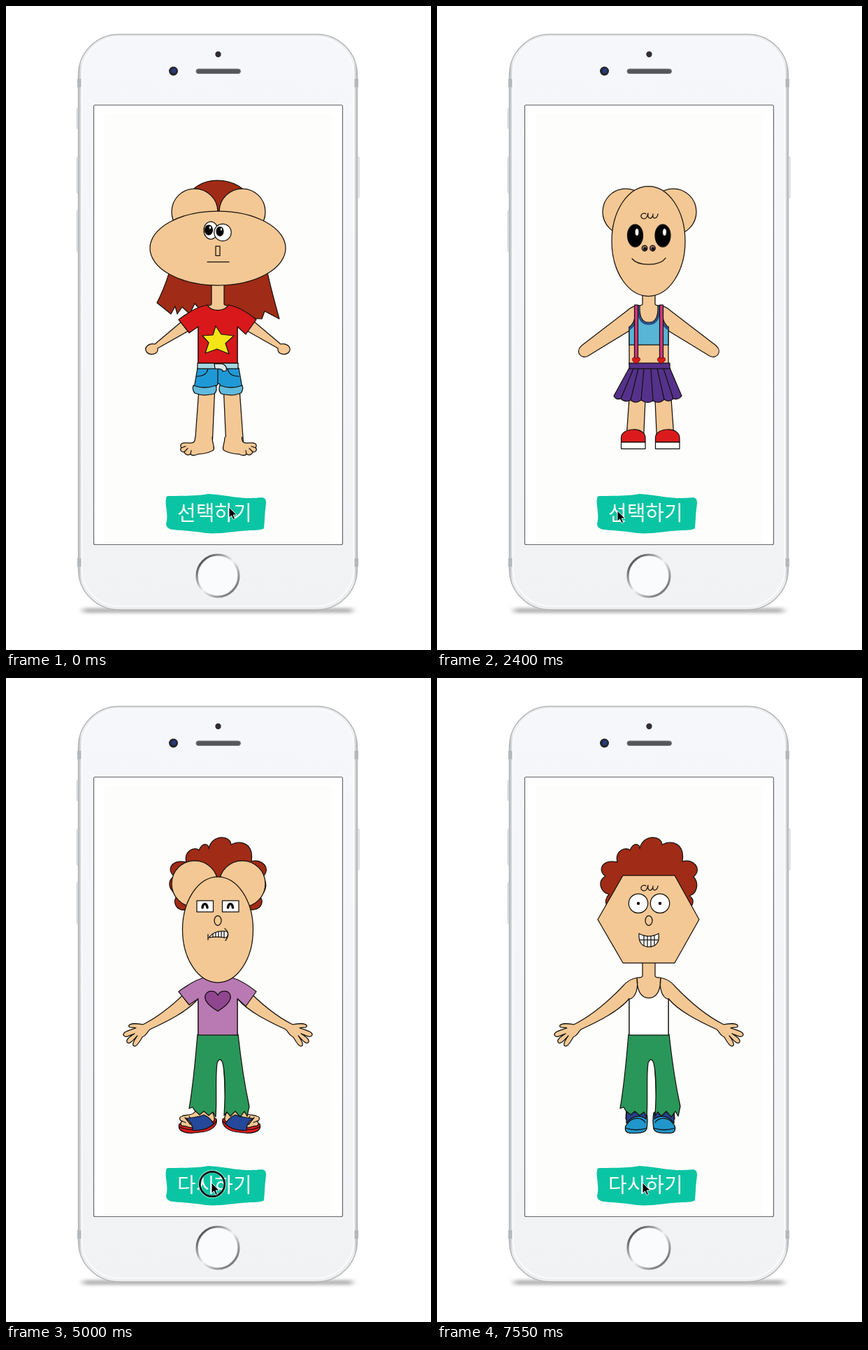
Write an HTML page that moves like this. It is 608 by 920 pixels and loops after 9.55 s.

```html
<!DOCTYPE html>
<html lang="ko">
<head>
<meta charset="utf-8">
<title>캐릭터 만들기</title>
<style>
html, body { margin: 0; width: 100%; height: 100%; overflow: hidden; background: #fff; }
svg { display: block; width: 608px; height: 920px; }
#character { stroke: #15110d; stroke-width: 1.25; stroke-linejoin: round; stroke-linecap: round; }
#label { font: 500 29px "Noto Sans CJK KR", "Noto Sans CJK", sans-serif; fill: #fff; }
.skin { fill: #f3c894; }
.flat { stroke: none; }
</style>
</head>
<body>
<svg viewBox="0 0 608 920">
  <defs>
    <linearGradient id="rim" x2="1">
      <stop offset="0" stop-color="#b6b8bb"/><stop offset=".012" stop-color="#eceef0"/>
      <stop offset=".988" stop-color="#eceef0"/><stop offset="1" stop-color="#b6b8bb"/>
    </linearGradient>
    <linearGradient id="shell" x2="0" y2="1">
      <stop offset="0" stop-color="#f6f7fa"/><stop offset="1" stop-color="#f1f2f4"/>
    </linearGradient>
    <linearGradient id="ring" x2="1" y2="1">
      <stop offset="0" stop-color="#222"/><stop offset=".25" stop-color="#888"/><stop offset=".5" stop-color="#f4f4f4"/>
      <stop offset=".75" stop-color="#999"/><stop offset="1" stop-color="#555"/>
    </linearGradient>
    <filter id="soft" x="-10%" y="-200%" width="120%" height="500%"><feGaussianBlur stdDeviation="5 2"/></filter>
  </defs>

  <rect width="608" height="920" fill="#fff"/>
  <rect x="110" y="860" width="386" height="7" rx="3" fill="#777" opacity=".55" filter="url(#soft)"/>
  <g fill="#f4f5f6" stroke="#c4c6c8">
    <rect x="101.500" y="145.500" width="4" height="30" rx="2"/>
    <rect x="101.500" y="215.500" width="4" height="52" rx="2"/>
    <rect x="101.500" y="291.500" width="4" height="60" rx="2"/>
    <rect x="501" y="215.500" width="4" height="59" rx="2"/>
  </g>
  <rect x="103.500" y="40.500" width="399" height="822" rx="58" fill="url(#rim)" stroke="#b2b4b5" stroke-width="1.400"/>
  <path d="M102 104h6v12h-6zM498 104h6v12h-6zM102 789h6v12h-6zM498 789h6v12h-6z" fill="#b5b7ba"/>
  <rect x="108.500" y="44.500" width="389" height="813" rx="54" fill="url(#shell)" stroke="#fafbfc" stroke-width="2"/>
  <circle cx="303.500" cy="69" r="4.200" fill="#302d30"/>
  <circle cx="239.500" cy="93" r="6.500" fill="#26262e"/>
  <circle cx="240" cy="92.500" r="3.500" fill="#273b78"/>
  <rect x="272" y="90" width="63.500" height="6.500" rx="3.200" fill="#55555a" stroke="#77777b"/>
  <rect x="125.500" y="141.500" width="356" height="628" rx="2" fill="#fff" stroke="#65676b" stroke-width="1.200"/>
  <rect x="141" y="154" width="325" height="614" fill="#fdfdfb"/>
  <circle cx="303" cy="814" r="30" fill="#fafbfc" stroke="url(#ring)" stroke-width="3.200"/>

  <g id="character"></g>

  <path d="M232 700C250 700 275 700 289 697C312 698 340 706 366 702Q373 703 372 711C370 725 370 737 369 746Q367 749 350 749C328 750 305 755 286 753C268 750 248 749 238 748Q229 747 229 739C233 727 227 714 229 704Q229 700 232 700Z" fill="#0ac5a3"/>
  <text id="label" x="245" y="735"></text>
  <g id="pointer">
    <g id="click" fill="none">
      <circle cx="1" cy="2" r="18" stroke="#fff" stroke-width="4.500" opacity=".5"/>
      <circle cx="1" cy="2" r="17.700" stroke="#111" stroke-width="2.700"/>
    </g>
    <path d="M0 0V15L3.500 12L6 17.500L8.500 16.500L6.200 11H11Z" fill="#000" stroke="#fff" stroke-width=".9"/>
  </g>
</svg>

<script>
const byId = id => document.getElementById(id);

const path = (d, fill = 'none', extra = '') => `<path d="${d}" fill="${fill}" ${extra}/>`;
const skin = d => `<path d="${d}" class="skin"/>`;
const oval = (cx, cy, rx, ry = rx, fill = '#fff', extra = '') =>
  `<ellipse cx="${cx}" cy="${cy}" rx="${rx}" ry="${ry}" fill="${fill}" ${extra}/>`;
const box = (x, y, w, h, fill) => `<rect x="${x}" y="${y}" width="${w}" height="${h}" fill="${fill}"/>`;
const shift = (art, x) => art + `<g transform="translate(${x})">${art}</g>`;
// Adds the reflection of a left-hand part; sum is twice the axis position.
const mirror = (art, sum = 606) => art + `<g transform="translate(${sum}) scale(-1 1)">${art}</g>`;

const SKIN = '#f3c894', RED_HAIR = '#a02b16', LILAC = '#b97ab4', RED = '#dc1a1c';

const shirt = fill => path('M288 427C276 429 264 435 247 448L262 467L275 458V510H331V458L343 469L358 448C342 435 330 429 318 427C313 437 293 437 288 427Z', fill);
const heart = 'M0 0C-15 -9 -20 -16 -17 -23C-13 -30 -3 -29 0 -22C3 -29 14 -30 17 -23C20 -16 13 -8 0 0Z';
const strap = shift(box(282.5, 427, 5, 78, '#cf367d') +
  path(heart, RED, 'transform="translate(285 511) scale(.32)" stroke-width="2"'), 36);

// Drawn back to front; every layer holds its interchangeable parts.
const layers = {
  back: [
    '',
    path('M302 249C338 249 364 277 368 330C370 375 379 402 391 447L370 436L366 447L345 446L333 432H276L270 425L263 440L252 430L245 440L242 429L236 440L216 424C229 398 237 375 242 338C243 287 263 249 302 249Z', RED_HAIR),
    path('M257 331C244 334 236 319 246 309C235 307 228 291 241 283C229 275 236 258 258 263C254 247 270 240 276 246C281 234 290 236 290 244C294 223 321 224 322 238C336 231 355 236 351 262C367 257 380 273 367 284C376 294 371 309 361 311C371 318 365 330 354 331Z', RED_HAIR)
  ],
  arms: [
    mirror(skin('M251 451L213 483C204 481 197 488 201 494C206 500 218 498 217 489L263 463')),
    mirror(skin('M288 428C281 428 276 431 271 436L207 485C197 494 206 505 216 500L275 464')),
    mirror(skin('M288 428C277 429 271 434 266 440C245 462 222 482 196 495C189 494 180 492 176 496C174 500 181 499 186 500C178 503 167 505 168 510C170 515 176 511 184 508C176 513 170 518 174 521C177 524 184 515 188 511C183 518 179 525 184 526C188 526 192 518 195 513C202 510 202 505 206 502C232 490 260 476 275 458'))
  ],
  body: [
    path('M288 428L294 427V398H312V427L318 428L331 440V512H275V440Z', SKIN, 'class="flat"') +
    mirror(path('M294 398V426Q293 428 288 428M275 458V512')) +
    mirror(skin('M276.500 540L270 630H295L299 540'), 610)
  ],
  feet: [
    mirror(skin('M270.500 616C271 627 263 624 256 624C249 624 249 629 251 631C248 634 251 638 255 637C256 642 262 642 264 640C267 644 273 641 275 640C285 640 290 638 296 635C300 632 295 626 295 616') +
      path('M251 631L257 629M255 637L260 632M264 640L265 635'), 608),
    shift(path('M263.500 623V617C263 602 298 600 298 617V623Z', RED) + box(263.5, 623, 34.5, 9.5, '#fff'), 49),
    mirror(path('M248 637C244 649 260 652 277 649C293 648 303 640 301 630L292 626Z', RED) +
      path('M248 641C262 649 291 645 301 633') +
      skin('M270 620C266 626 257 623 252 626C246 627 249 633 252 633C247 638 252 641 256 640C270 646 289 640 297 633C301 628 295 625 295 616') +
      path('M252 633L257 635M256 628L264 638M262 626L268 635') +
      path('M257 629C265 629 278 626 283 624C290 627 294 631 297 637C289 645 276 647 267 646C267 640 264 633 257 629Z', '#24489a'), 611),
    mirror(path('M272 621H300C302 631 301 638 300 644Q298 650 286 650H275C268 649 268 641 272 637Z', '#2196cc') +
      path('M271 620H299V630C290 623 278 626 271 636Z', '#28418f') +
      path('M273 636C279 627 293 627 298 635M270 643Q285 648 300 643'), 610)
  ],
  bottom: [
    path('M274 517H333L338 546H308C307 540 304 538 303 540L299 546H269Z', '#1f99d6') +
    mirror(path('M268 542Q284 548 300 542Q303 549 298 554Q282 558 270 553Q266 548 268 542Z', '#62bbdd') +
      path('M289 518Q287 529 273 529')) + path('M303 518V540') + box(274, 510, 58, 8, '#a5d7df') +
    path('M298 511H309Q317 514 315 521L310 522Q311 518 299 518Z', '#dce8e8'),
    path('M275 517L253 557Q256 563 263 561Q269 567 277 563Q284 569 292 563Q301 569 309 564Q318 569 325 562Q332 567 338 561Q346 563 350 557L333 517Z', '#55318b') +
    path('M281 518L263 561M288 518L277 563M296 518L292 563M306 518L309 564M315 518L325 562M324 518L338 561') +
    box(275, 510, 58, 8, '#55318b'),
    path('M274 509H332C336 546 340 575 348 612L345 626L341 619L335 627L328 619L321 626L316 620L312 625C314 592 313 563 310 550Q306 540 302 550C299 575 302 600 300 627L296 620L290 625L283 619L277 624L270 618L267 613L262 615C268 580 271 545 274 509Z', '#299759'),
    mirror(path('M275 520L273.500 558H298L300 520', '#fff'), 610) +
    path('M276 510H331C335 521 341 528 346 532C346 539 340 538 335 536C333 545 326 541 322 537C319 548 312 543 309 538C304 548 298 543 296 539C290 550 286 540 283 536C277 542 273 539 271 537C266 543 260 540 260 535C269 530 273 521 276 510Z', LILAC)
  ],
  top: [
    shirt('#d9181b') + path('M300 457L308 469L326 471L314 482L319 497L302 490L285 496L290 481L281 471L296 470Z', '#f5e516'),
    path('M275 484V459C284 452 285 441 283 428H290C289 448 296 452 303 452C310 452 317 448 316 428H323C321 441 322 452 331 459V484Z', '#58b5d5') +
    path('M288 429C287 449 295 454 303 454C311 454 319 449 318 429M276 461Q286 453 286 444M330 461Q320 453 320 444', 'none', 'stroke="#294d84" stroke-width="3"') + strap,
    shirt(LILAC) + path(heart, '#8f468f', 'transform="translate(303 476) scale(1.03)"'),
    path('M275 510V459C286 456 288 440 286 428C286 452 295 457 303 457C311 457 320 452 320 428C318 440 320 456 331 459V510Z', '#fff')
  ],
  ears: [
    '',
    mirror(oval(270, 294, 33, 33, SKIN), 608),
    mirror(oval(242, 350, 21, 19, SKIN), 605)
  ],
  face: [
    oval(303, 346, 97, 53, SKIN),
    oval(302.5, 336, 52.5, 78.5, SKIN),
    oval(303, 359.5, 50.5, 75.5, SKIN),
    skin('M266 282H340L375 345L340 407H266L230 345Z')
  ],
  eyes: [
    oval(293, 320.5, 10, 12.5) + oval(290, 320, 5.5, 7, '#000') + oval(292, 316.5, 1.8, 2.6) +
    oval(310, 323.5, 12.2) + oval(306, 322, 5, 6.5, '#000') + oval(308, 319, 1.7, 2.4),
    shift(oval(283.5, 328, 11, 16, '#000') + oval(286, 323, 3, 5.5), 39.5),
    shift(box(273, 318, 23.5, 16, '#fff') + path('M281 328C282 321 287 321 288 328', 'none', 'stroke-width="3.600"'), 36.5),
    shift(oval(288, 322, 13.7) + oval(288, 322, 1.6, 1.6, '#000'), 31)
  ],
  nose: [
    box(300, 343, 6, 13.5, 'none'),
    shift(oval(297, 346, 3.8, 4, '#a67472') + oval(297.5, 347, 1.8, 2, '#17142c'), 11.5),
    oval(303, 346.5, 5, 7, 'none'),
    oval(303, 343.5, 8, 6, '#e9b580') + oval(300.5, 343.5, 1.5, 2.5, '#51301d') + oval(305.5, 343.5, 1.5, 2.5, '#51301d')
  ],
  mouth: [
    path('M288 365.500H319'),
    path('M279 361C288 372 318 372 327 360'),
    path('M290 371C297 361 309 361 316 362C319 365 317 369 315 371C308 370 298 369 290 371Z', '#fff') +
    path('M289 366V374M296 366V370M300 364V370M304 363V370M308 362V370M312 362V371M313 358Q322 365 314 375'),
    path('M289 365C298 370 308 370 317 365C319 378 313 384 303 384C293 384 288 377 289 365Z', '#fff') +
    path('M290 374H316M296 368V382M301 369V384M306 369V384M311 368V381')
  ],
  front: [
    '',
    path('M299 297C293 293 288 303 296 304C300 304 301 300 302 296C300 306 309 305 309 297C307 306 316 304 316 297'),
    path('M264 297C261 283 258 276 255 267L264 265L261 244L273 251L275 237L287 248L298 231L305 247L315 236L319 251L330 246L328 257L334 252L333 262L340 258L338 266L345 266C340 278 341 289 337 300Q328 303 319 296C306 292 296 301 286 296Q274 292 264 297Z', '#56300f')
  ]
};

const names = Object.keys(layers);
const character = byId('character');
const groups = names.map(() => {
  const group = document.createElementNS('http://www.w3.org/2000/svg', 'g');
  character.append(group);
  return group;
});

// Part choices in the order: back arms body feet bottom top ears face eyes nose mouth front.
const looks = {
  long: '100000100000',
  skirt: '010111111111',
  curly: '220222122220',
  spiky: '110231210322',
  tank: '220323033231'
};

const LOOP = 9550, STEP = 50;
const REST = [294, 721];
const scenes = [
  { at: 0, still: STEP, look: 'long', from: [319, 716], to: [342, 721], idle: '선택하기' },
  { at: 400, still: 2000, look: 'skirt', from: [342, 721], to: [342, 721], idle: '다시하기' },
  { at: 2400, still: STEP, look: 'skirt', from: [258, 721], to: REST, idle: '선택하기' },
  { at: 3000, still: 2000, look: 'curly', from: REST, to: REST, idle: '다시하기' },
  { at: 5000, still: STEP, look: 'curly', from: REST, to: REST, idle: '다시하기', click: true },
  { at: 5300, still: 2000, look: 'spiky', from: REST, to: REST, idle: '다시하기' },
  { at: 7300, still: STEP, look: 'spiky', from: REST, to: REST, idle: '다시하기', click: true },
  { at: 7550, still: 2000, look: 'tank', from: REST, to: REST, idle: '다시하기' }
];

const pick = (step, layer, count) => {
  const noise = Math.sin(step * 12.9898 + layer * 78.233) * 43758.5453;
  return Math.floor((noise - Math.floor(noise)) * count);
};

function render(time) {
  const step = Math.floor(time / STEP);
  const index = scenes.findLastIndex(scene => scene.at <= time);
  const scene = scenes[index];
  const end = index + 1 < scenes.length ? scenes[index + 1].at : LOOP;
  const local = step * STEP - scene.at;
  const still = local < scene.still;

  groups.forEach((group, i) => {
    const parts = layers[names[i]];
    const choice = still ? +looks[scene.look][i] : pick(step, i, parts.length);
    if (group.dataset.choice !== String(choice)) {
      group.dataset.choice = choice;
      group.innerHTML = parts[choice];
    }
  });

  const progress = local / (end - scene.at);
  const [x, y] = scene.from.map((start, i) => start + (scene.to[i] - start) * progress);
  byId('pointer').setAttribute('transform', `translate(${x} ${y})`);
  byId('click').style.display = scene.click && still ? '' : 'none';
  byId('label').textContent = still ? scene.idle : '선택하기';
}

function tick() {
  render(performance.now() % LOOP);
  requestAnimationFrame(tick);
}
tick();
</script>
</body>
</html>
```
